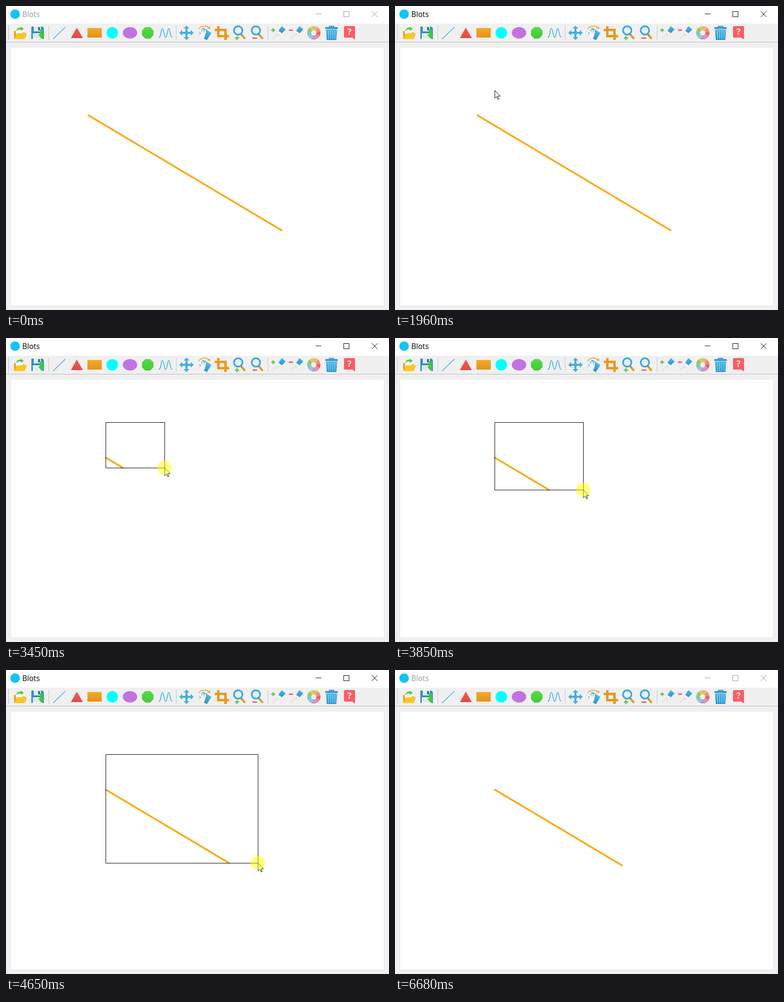
These frames come from a looping animation (800x635 px, 6.84 s). An HTML page:

```html
<!DOCTYPE html>
<html lang="en">
<head>
<meta charset="utf-8">
<title>Crop tool</title>
<style>
html, body { margin: 0; width: 100%; height: 100%; overflow: hidden; background: #f0f0f0; }
svg { display: block; width: 800px; height: 635px; }
text { font-family: "Open Sans", "Noto Sans", sans-serif; }
</style>
</head>
<body>
<svg viewBox="0 0 800 635" fill="none">
  <defs>
    <linearGradient id="blue" x2="0" y2="1"><stop stop-color="#4ab8ea"/><stop offset="1" stop-color="#2b93d1"/></linearGradient>
    <linearGradient id="gold" x2="0" y2="1"><stop stop-color="#f2ab2c"/><stop offset="1" stop-color="#e49318"/></linearGradient>
    <linearGradient id="red" x2="0" y2="1"><stop stop-color="#ee5f57"/><stop offset="1" stop-color="#df4b46"/></linearGradient>
    <linearGradient id="green" x2="0" y2="1"><stop stop-color="#55dc4b"/><stop offset="1" stop-color="#41cb32"/></linearGradient>
    <linearGradient id="glass" x2="1" y2="1"><stop stop-color="#d5e4ee"/><stop offset="1" stop-color="#fff"/></linearGradient>
    <g id="lens">
      <path d="M7 9L13 16" stroke="#e99a1d" stroke-width="4.5" stroke-linecap="round"/>
      <path d="M5 7L8 10" stroke="#8b8f94" stroke-width="2.5"/>
      <circle r="8.8" fill="url(#glass)" stroke="#3aa7e0" stroke-width="3.4"/>
    </g>
    <g id="pin">
      <path d="M-12 13L0 1" stroke="#d8d8d8" stroke-width="1.2"/>
      <path d="M-6 5L1 -2L6 3L-1 8Z" fill="#e6e6e8"/>
      <path d="M0 -4L7 -14L15 -7L7 1Z" fill="url(#blue)"/>
      <path d="M0 -4L7 1L4 4L-2 -1Z" fill="#f7f7f7"/>
    </g>
    <path id="tip" d="M0 -15L6 -9H2V-2H-2V-9H-6Z"/>
  </defs>

  <rect width="800" height="635" fill="#f0f0f0"/>
  <rect width="800" height="37" fill="#fff"/>
  <circle cx="19" cy="17" r="10" fill="#10c4f4"/>
  <g id="caption">
    <text x="34" y="23" font-size="15.7" fill="currentColor">Blots</text>
    <g stroke="currentColor">
      <path d="M647 16.5H659M705.5 11.5H716.5V22.5H705.5Z" shape-rendering="crispEdges"/>
      <path d="M764 11L776 23M776 11L764 23"/>
    </g>
  </g>

  <g shape-rendering="crispEdges">
    <path d="M0 75.5H800" stroke="#b9b9b9"/>
    <path d="M5.5 40V71" stroke="#a0a0a0" stroke-width="1.5" stroke-dasharray="1.5 1.5"/>
    <path d="M89.5 41V71M355.5 41V71M547.5 41V71" stroke="#c6c6c6"/>
    <rect x="11" y="87" width="778" height="538" fill="#fff"/>
    <rect id="press" x="433.5" y="38.5" width="35" height="34" fill="#cce8ff" stroke="#99d1ff"/>
  </g>

  <!-- open, save -->
  <path d="M17 69V52H24L26 55H39V69Z" fill="#e7a01b"/>
  <path d="M20 50L33 48L37 60H21Z" fill="#fafafa"/>
  <path d="M17 69L23 57H44L39 69Z" fill="#fcc521"/>
  <path d="M21 53Q23 44 31 45V43L37 48L31 52V49Q26 48 21 53Z" fill="#4fca3a"/>
  <path d="M53 43H76L79 46V69H53Z" fill="#2f8fc7"/>
  <path d="M58 43H73V53H58Z" fill="#e4edf3"/>
  <path d="M67 44H71V51H67Z" fill="#2672a3"/>
  <path d="M56 57H76V69H56Z" fill="#f6f6f6"/>
  <path d="M58 60.5H73M58 63.5H73M58 66.5H70" stroke="#c2cbd1"/>
  <path d="M71 49H77V59H81L74 69L67 59H71Z" fill="#40cb32"/>

  <!-- shapes -->
  <path d="M98.5 69L124 44" stroke="#3daee6" stroke-width="1.5"/>
  <path d="M148 45L160.5 67H135.5Z" fill="url(#red)"/>
  <rect x="170" y="46" width="30" height="20" fill="url(#gold)"/>
  <circle cx="222" cy="56" r="12" fill="#0ff"/>
  <ellipse cx="259" cy="56" rx="15" ry="12" fill="#c173e2"/>
  <path d="M291 44H301L308 51V61L301 68H291L284 61V51Z" fill="url(#green)"/>
  <path d="M319 65.5C325 65 323 47 326.500 47S330 65.500 333.500 65.500S337 47 340 47S342 65 347.500 65.500" stroke="#3daee6" stroke-width="1.6"/>

  <!-- move, rotate, crop -->
  <g id="cross" transform="translate(377 56)" fill="#43aee6"></g>
  <g transform="rotate(32 415 58)">
    <rect x="405" y="49" width="21" height="18" rx="1" fill="url(#blue)"/>
  </g>
  <path d="M407 67L402 59Q401 56 404 57L407 60L405 51Q406 48 408 51L410 56V49Q412 47 413 50V56L415 51Q417 49 418 52L416 62Q415 67 411 69Z" fill="#f6f8fa" stroke="#cbd8e0" stroke-width=".6"/>
  <path d="M402 48Q413 37 424 46" stroke="#eca32d" stroke-width="1.7"/>
  <path d="M427 48L420.500 47L425.500 42.500Z" fill="#eca32d"/>
  <path d="M443.500 42V63H466M436 50H458.500V71" stroke="#e8981d" stroke-width="5"/>

  <!-- zoom -->
  <use href="#lens" x="485" y="51"/>
  <use href="#lens" x="522" y="51"/>
  <path d="M478 67H487M482.500 62.500V71.500M554 50.500H562M558 46.500V54.500" stroke="#58c44c" stroke-width="2.4"/>
  <path d="M515 67H524.500M591 50.500H599.500" stroke="#e94b4b" stroke-width="2.4"/>

  <!-- pins, colours, bin, help -->
  <use href="#pin" x="569" y="56"/>
  <use href="#pin" x="606" y="56"/>
  <g id="wheel" stroke-width="8.5"></g>
  <path d="M675.500 45V42.500H684.500V45" stroke="#318fc6" stroke-width="1.8"/>
  <rect x="667" y="44" width="26" height="4" rx="1" fill="#3198d0"/>
  <path d="M668.500 49H691.500L690 71H670Z" fill="url(#blue)"/>
  <path d="M673.500 51V69M678 51V69M682.500 51V69M687 51V69" stroke="#8bd2f2" stroke-width="1.3"/>
  <path d="M708 42H727Q729 42 729 44V70L723 66H708Q706 66 706 64V44Q706 42 708 42Z" fill="#fc5c64"/>
  <text x="717.500" y="60" font-size="18" font-weight="700" text-anchor="middle" fill="#ffe9e9">?</text>

  <line id="stroke" stroke="#ffa500" stroke-width="3.500" stroke-linecap="round"/>
  <rect id="frame" x="208.500" y="176.500" stroke="#000" shape-rendering="crispEdges"/>
  <path id="arrow" d="M.500 .500V16.500L4.300 13L6.900 18.900L9.200 17.900L6.700 12.100H11.700Z" fill="#fff" stroke="#000"/>
  <circle id="glow" r="15" fill="#ff0" fill-opacity=".5"/>
</svg>
<script>
const LOOP = 6840, STEP = 80;
const $ = id => document.getElementById(id);
const set = (el, attrs) => { for (const k in attrs) el.setAttribute(k, attrs[k]); };
const show = (el, on) => set(el, { visibility: on ? 'visible' : 'hidden' });

$('cross').innerHTML = [0, 90, 180, 270]
  .map(a => `<use href="#tip" transform="rotate(${a})"/>`).join('') +
  '<rect x="-3" y="-3" width="6" height="6"/>';

const hues = ['#f0b565', '#ee9268', '#f05f66', '#e88bb1', '#c596d1', '#8ec8dc', '#7fc9b1', '#9bc36a', '#d5cb65'];
$('wheel').innerHTML = hues.map((c, i) => {
  const at = k => {
    const a = k / hues.length * 2 * Math.PI - Math.PI / 2;
    return `${643 + 9.75 * Math.cos(a)} ${56 + 9.75 * Math.sin(a)}`;
  };
  return `<path d="M${at(i)}A9.75 9.75 0 0 1 ${at(i + 1)}" stroke="${c}"/>`;
}).join('');

// Pointer moves: start time, then [step, x, y] stops.
const moves = [
  [140, [[0, 647, 504], [1, 600, 400], [3, 500, 180], [4, 468, 105], [5, 450, 62], [6, 442, 45]]],
  [1320, [[-1, 442, 45], [2, 355, 98], [5, 232, 190], [6, 214, 200], [8, 208, 176]]],
  [2730, [[-1, 208, 176], [3, 237, 205], [9, 331, 271], [17, 430, 345], [18, 448, 359], [24, 526, 403]]],
  [4800, [[0, 531, 406], [1, 534, 408]]],
  [5890, [[-1, 534, 408], [0, 541, 390], [1, 565, 381], [2, 620, 410], [3, 680, 490], [4, 727, 600]]]
];

function pointer(t) {
  const [start, stops] = moves.filter(m => m[0] <= t).pop() || moves[0];
  const n = Math.max(0, Math.floor((t - start) / STEP));
  const i = stops.findIndex(s => s[0] >= n);
  if (i < 0) return stops[stops.length - 1].slice(1);
  const b = stops[i], a = stops[i - 1] || b;
  const f = a === b ? 1 : (n - a[0]) / (b[0] - a[0]);
  return [1, 2].map(k => Math.round(a[k] + (b[k] - a[k]) * f));
}

const lineX = y => 172.5 + (y - 228.5) * 403 / 240;
const lineY = x => 228.5 + (x - 172.5) * 240 / 403;

function draw(t) {
  const within = (a, b) => t >= a && t < b;
  const [x, y] = pointer(t);
  const place = { transform: `translate(${x} ${y})` };

  $('caption').style.color = within(1010, 6680) ? '#000' : '#999';
  show($('press'), within(1010, 1090));

  set($('arrow'), place);
  show($('arrow'), within(140, 6290));
  set($('glow'), place);
  show($('glow'), within(1010, 1090) || within(2270, 5430));

  const dragging = within(2730, 5430);
  show($('frame'), dragging);
  if (dragging) set($('frame'), { width: x - 208, height: y - 176 });

  const end = t < 5430 ? y : 408;
  const cut = t >= 2730 && end > 249;
  set($('stroke'), cut
    ? { x1: 208.5, y1: lineY(208.5), x2: lineX(end), y2: end }
    : { x1: 172.5, y1: 228.5, x2: 575.5, y2: 468.5 });
}

const begin = performance.now();
function tick() {
  draw((performance.now() - begin) % LOOP);
  requestAnimationFrame(tick);
}
tick();
</script>
</body>
</html>
```
